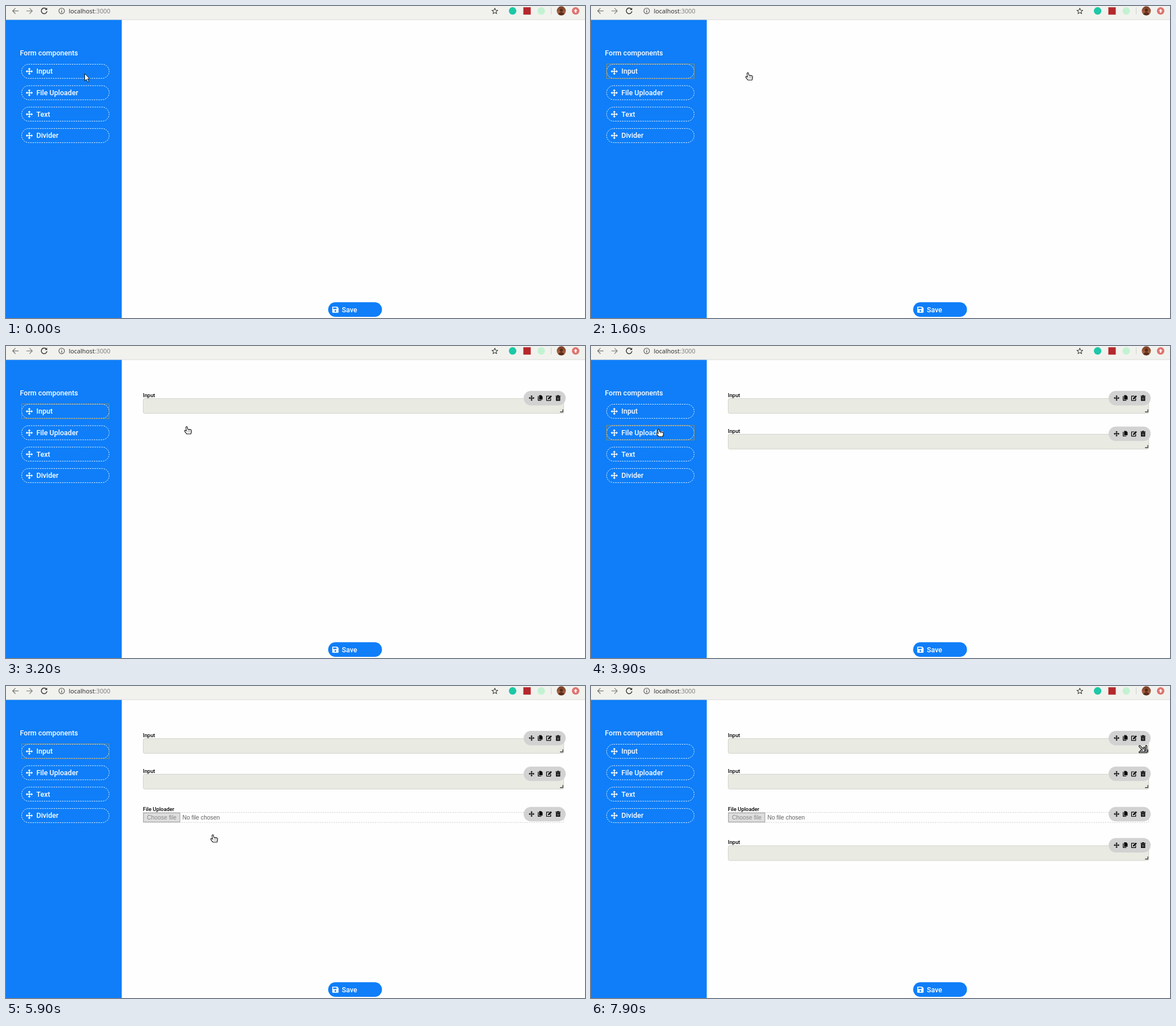
An HTML page that plays this animation: 1019x549 px, repeating every 8000 ms.

```html
<!DOCTYPE html>
<html lang="en">
<head>
<meta charset="utf-8">
<title>Form builder</title>
<style>
html, body { margin: 0; height: 100%; overflow: hidden; background: #fefefe; }
svg { display: block; width: 100%; height: 100%; }
text { font: 500 12.5px Roboto, sans-serif; white-space: pre; }
.label { font-size: 9.4px; }
.url { font: 10.8px "Noto Sans", "Open Sans", sans-serif; }
.file { font: 10.4px "Liberation Sans", Arial, sans-serif; }
.line { fill: none; stroke-linecap: round; stroke-linejoin: round; }
</style>
</head>
<body>
<svg viewBox="0 0 1019 549">
  <defs>
    <g id="move">
      <path d="M-4.5 0H4.5M0-4.5V4.5" stroke="currentColor" stroke-width="1.5"/>
      <path d="M0-6.2L2.5-3.5H-2.5ZM0 6.2L2.5 3.5H-2.5ZM-6.2 0L-3.5-2.5V2.5ZM6.2 0L3.5-2.5V2.5Z" fill="currentColor"/>
    </g>
    <g id="tools">
      <rect x="911" y="0" width="74" height="25.5" rx="12.7" fill="#d2d2d2"/>
      <use href="#move" transform="translate(925 12.6) scale(.8)"/>
      <path d="M938.3 7.6h3.6l2.4 2.3v5.4h-6z"/>
      <path d="M937.2 9.2h-1.2v8h6.2v-1.1h-5z"/>
      <path class="line" d="M956 9.2h-4.6v7.6h7.2v-3.4" stroke="#000" stroke-width="1.2"/>
      <path d="M954.2 12.6l4.6-4.7 1.9 1.9-4.6 4.6-2.3.4z"/>
      <path d="M967.3 8.4h2.5l.6-.9h2.4l.6.9h2.5v1.3h-8.6zM967.9 10.3h7.4v7.1h-7.4z"/>
      <path d="M970 11.7v4.4M971.6 11.7v4.4M973.2 11.7v4.4" stroke="#d2d2d2" stroke-width=".6"/>
    </g>
    <g id="arrow">
      <path d="M.5.5V13.2L3.5 10.5 5.6 15.3 7.7 14.3 5.6 9.7H9.4Z" fill="#fff" stroke="#111"/>
    </g>
    <g id="hand" class="line">
      <path d="M-1.4 1.2A1.3 1.3 0 0 1 1.2 1.2L1.7 4.2 6.8 5Q8.5 5.4 8.5 7L8.2 10 7.3 12.8H.2L-3.3 8.6Q-4.2 6.6-2.5 6.4L-.6 7.6Z" fill="#fff" stroke="#111" stroke-width="1.1"/>
      <path d="M3.6 4.8v1.7M6 5.2v1.5" stroke="#111" stroke-width=".8"/>
    </g>
    <g id="grab">
      <use href="#hand"/>
      <path d="M1.6 9h1M3.9 9h1M6.1 9h1" stroke="#111"/>
    </g>
    <g id="resize">
      <path id="corner" class="line" d="M-5.5-4.5L2 3M2.4-2V3.4H-3M6.2-5V5.8H-5.5" stroke="#111" stroke-width="3.2"/>
      <use href="#corner"/>
      <path class="line" d="M-5.5-4.5L2 3M2.4-2V3.4H-3M6.2-5V5.8H-5.5" stroke="#fff" stroke-width="1.1"/>
    </g>
    <linearGradient id="photo" x2="0" y2="1">
      <stop stop-color="#7a3d24"/><stop offset="1" stop-color="#b8754f"/>
    </linearGradient>
  </defs>

  <rect width="1019" height="549" fill="#fefefe"/>
  <rect y="24" width="203.7" height="525" fill="#0f7ef8"/>
  <rect width="1019" height="23.5" fill="#f1f2ee"/>
  <rect y="23.5" width="1019" height="1" fill="#d8d9d6"/>

  <g class="line" stroke-width="1.3">
    <path d="M21.5 8.7H11.8M16.3 4.1L11.7 8.7l4.6 4.6" stroke="#777"/>
    <path d="M36.5 8.7h9.7M41.7 4.1l4.6 4.6-4.6 4.6" stroke="#888"/>
    <path d="M71 5.4A5 5 0 1 0 72 9.7" stroke="#333" stroke-width="1.5"/>
    <path d="M72.4 3v4h-4z" fill="#333"/>
    <circle cx="98" cy="8.7" r="4.9" stroke="#555" stroke-width="1.1"/>
    <path d="M98 8.4v2.8M98 6.1v.1" stroke="#555"/>
    <path d="M860.3 3.8l1.5 3.4 3.7.3-2.8 2.4.9 3.6-3.3-1.9-3.2 1.9.8-3.6-2.8-2.4 3.7-.3z" stroke="#444" stroke-width="1.1"/>
  </g>
  <text class="url" x="110.5" y="12.5" fill="#333">localhost<tspan fill="#808080">:3000</tspan></text>
  <circle cx="891.6" cy="8.6" r="6.6" fill="#1cc8a6"/>
  <rect x="910.5" y="2.2" width="13" height="13" fill="#b5282c"/>
  <circle cx="942" cy="8.6" r="6.6" fill="#c3f2d2"/>
  <path d="M959.5 2.5v12" stroke="#d0d0cc"/>
  <circle cx="977.3" cy="8.6" r="8" fill="url(#photo)"/>
  <path d="M972 14.5a5.4 4.4 0 0 1 10.6 0a8 8 0 0 1-10.6 0zM974.7 7.6a2.7 3 0 1 0 5.4 0a2.7 3 0 1 0-5.4 0z" fill="#5a2c1c"/>
  <circle cx="1002.5" cy="8.6" r="6.6" fill="#df7570"/>
  <path d="M1002.5 5.2l3.2 3.5h-2v3h-2.4v-3h-2z" fill="#fff"/>

  <text x="24.6" y="86.5" fill="#fff">Form components</text>
  <g id="menu"></g>
  <rect id="focus" x="27.5" width="154" height="25.6" fill="none" stroke="#e59700" stroke-opacity=".62"/>

  <rect x="567" y="521.3" width="94.7" height="25.6" rx="12.8" fill="#0f7ef8"/>
  <path d="M575.2 529h7.6l2.5 2.5v7.2q0 1-1 1h-9.1q-1 0-1-1V530q0-1 1-1z" fill="#fff"/>
  <path d="M575.8 530.5h6v2.8h-6z" fill="#0f7ef8"/>
  <circle cx="579.7" cy="536.6" r="1.6" fill="#0f7ef8"/>
  <text x="591" y="538.6" fill="#fff">Save</text>

  <g id="items"></g>
  <g id="ghost"></g>
  <use id="cursor"/>
</svg>
<script>
const $ = id => document.getElementById(id);
const LOOP = 8000, STEP = 100;
const names = ["Input", "File Uploader", "Text", "Divider"];
const rowY = row => 102 + row * 37.7;

// One drag each: picked up, released, placed on the form
const drags = [
  { row: 0, pick: 1100, drop: 1600, add: 1900, y: 79 },
  { row: 0, pick: 2900, drop: 3200, add: 3400, y: 141.8 },
  { row: 1, pick: 4500, drop: 4800, add: 5000, y: 212.7 },
  { row: 0, pick: 5500, drop: 5900, add: 6200, y: 267.5 }
];

// Start time and menu row of the focus ring; -1 hides it
const focus = [[0, -1], [900, 0], [3900, 1], [5400, 0], [7500, -1]];

// Cursor stops: time, x, y
const path = [
  [0, 138, 118.5], [1000, 138, 118.5], [1200, 170, 118], [1500, 276, 117.5],
  [1900, 276, 117.5], [2500, 146, 120], [2700, 126, 115.5], [2800, 123, 114],
  [3100, 318, 142], [3400, 318, 142], [3800, 121, 148], [3900, 119, 146.5],
  [4400, 119, 146.5], [4500, 130, 158], [4700, 313, 250], [5000, 313, 250],
  [5300, 132, 118], [5400, 128, 115], [5500, 140, 121], [5800, 350, 257],
  [5900, 364, 262], [6300, 364, 262], [6900, 980, 130], [7000, 975, 120],
  [7100, 975, 120], [7200, 972, 113], [7600, 970, 109], [7900, 971, 110.5]
];

const button = (row, fill = "none") => `
  <rect x=".5" y=".5" width="154" height="24.8" rx="12.4" fill="${fill}"
    stroke="#fff" stroke-width=".9" stroke-dasharray="2.4 1.6"/>
  <use href="#move" x="14" y="13" color="#fff"/>
  <text x="26.5" y="17.4" fill="#fff">${names[row]}</text>`;

const inputBody = `
  <text class="label" x="241" y="10.8">Input</text>
  <rect x="241.5" y="13.5" width="740" height="26" rx="2.5" fill="#e9eae2" stroke="#d2d3cc"/>
  <path d="M980 32.5V37H975" fill="none" stroke="#444" stroke-width="1.4"/>`;

const fileBody = `
  <text class="label" x="241" y="7.2">File Uploader</text>
  <rect x="241.5" y="9.8" width="740" height="17.6" fill="none" stroke="#ccc" stroke-width=".9" stroke-dasharray="2.4 1.6"/>
  <rect x="242" y="10.6" width="64" height="16" fill="#dedede" stroke="#999"/>
  <text class="file" x="248" y="22.4" fill="#888">Choose file</text>
  <text class="file" x="310.4" y="22.4" fill="#606060">No file chosen</text>`;

$("menu").innerHTML = names.map((_, row) =>
  `<g transform="translate(27 ${rowY(row)})">${button(row)}</g>`).join("");
$("items").innerHTML = drags.map(d =>
  `<g transform="translate(0 ${d.y})">${d.row ? fileBody : inputBody}<use href="#tools"/></g>`).join("");
$("ghost").innerHTML = [0, 1].map(row =>
  `<g opacity=".75">${button(row, "#0f7ef8")}</g>`).join("");

function show(el, on) {
  el.setAttribute("visibility", on ? "visible" : "hidden");
}

function cursorAt(t) {
  const i = path.findIndex(p => p[0] > t);
  if (i < 0) return path[path.length - 1].slice(1);
  const [t0, x0, y0] = path[i - 1], [t1, x1, y1] = path[i];
  const k = (t - t0) / (t1 - t0);
  return [x0 + (x1 - x0) * k, y0 + (y1 - y0) * k];
}

function cursorKind(t, x) {
  if (drags.some(d => t >= d.pick && t < d.add)) return "grab";
  if (t >= 7200) return "resize";
  return t >= 500 && x < 183 ? "hand" : "arrow";
}

function draw(now) {
  const t = Math.floor(now % LOOP / STEP) * STEP;
  const [x, y] = cursorAt(t);
  const held = drags.find(d => t >= d.pick && t < d.drop);
  const row = focus.filter(f => f[0] <= t).pop()[1];

  drags.forEach((d, i) => show($("items").children[i], t >= d.add));
  [0, 1].forEach(r => show($("ghost").children[r], held && held.row === r));
  $("ghost").setAttribute("transform", `translate(${x + 1} ${y + 1})`);
  show($("focus"), row >= 0);
  $("focus").setAttribute("y", rowY(Math.max(row, 0)));
  $("cursor").setAttribute("href", "#" + cursorKind(t, x));
  $("cursor").setAttribute("transform", `translate(${x} ${y})`);
  requestAnimationFrame(draw);
}
requestAnimationFrame(draw);
</script>
</body>
</html>
```
